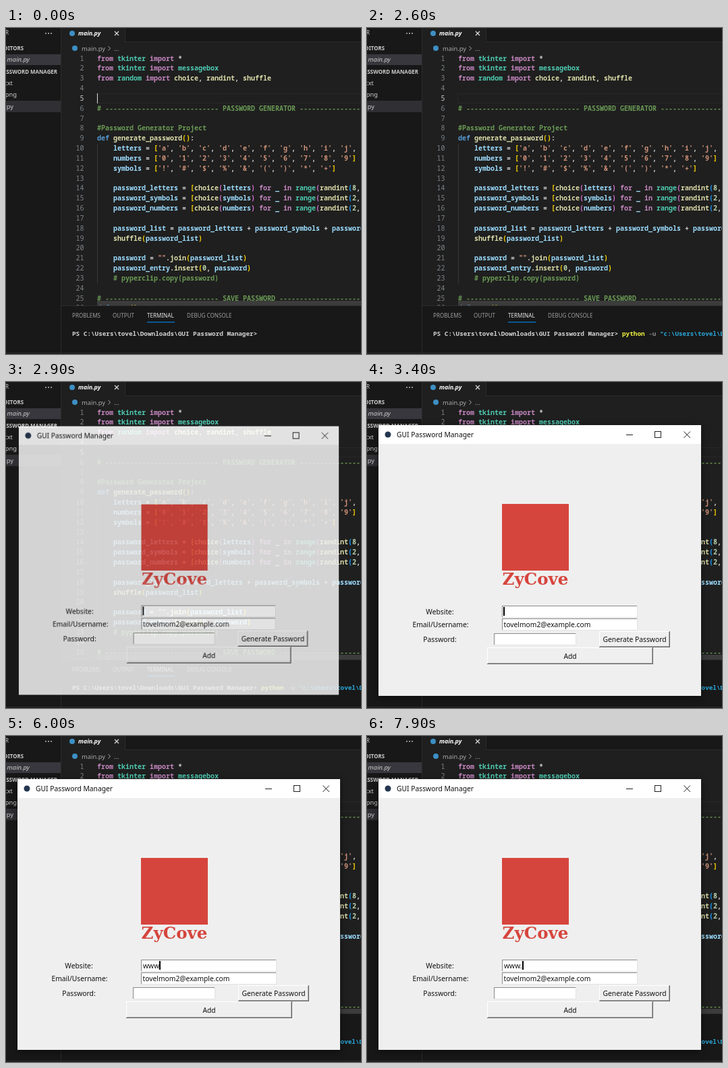
Recreate the animation shown at these times as an HTML page with a canvas. Size 526x484 px, loop 8 s.

```html
<!DOCTYPE html>
<html lang="en">
<head>
<meta charset="utf-8">
<title>Password manager demo</title>
<style>
html, body { margin: 0; width: 100%; height: 100%; overflow: hidden; background: #181818; }
canvas { display: block; }
</style>
</head>
<body>
<canvas id="stage" width="526" height="484"></canvas>
<script>
const W = 526, H = 484, LOOP = 8000;
const SANS = '"Noto Sans", "Open Sans", sans-serif';
const MONO = '"Noto Sans Mono", "DejaVu Sans Mono", monospace';
const RED = '#d6453d';

const CODE = [
  'from tkinter import *',
  'from tkinter import messagebox',
  'from random import choice, randint, shuffle',
  '', '',
  `# ${'-'.repeat(28)} PASSWORD GENERATOR ${'-'.repeat(31)} #`,
  '',
  '#Password Generator Project',
  'def generate_password():',
  `    letters = [${[...'abcdefghijkl'].map(c => `'${c}'`).join(', ')}]`,
  `    numbers = [${[...'0123456789'].map(c => `'${c}'`).join(', ')}]`,
  `    symbols = [${[...'!#$%&()*+'].map(c => `'${c}'`).join(', ')}]`,
  '',
  '    password_letters = [choice(letters) for _ in range(randint(8, 10))]',
  '    password_symbols = [choice(symbols) for _ in range(randint(2, 4))]',
  '    password_numbers = [choice(numbers) for _ in range(randint(2, 4))]',
  '',
  '    password_list = password_letters + password_symbols + password_numbers',
  '    shuffle(password_list)',
  '',
  '    password = "".join(password_list)',
  '    password_entry.insert(0, password)',
  '    # pyperclip.copy(password)',
  '',
  `# ${'-'.repeat(28)} SAVE PASSWORD ${'-'.repeat(31)} #`,
  'def save():'
];

const WORD_COLORS = {};
const paintWords = (color, words) => words.split(' ').forEach(w => WORD_COLORS[w] = color);
paintWords('#c586c0', 'from import for in');
paintWords('#569cd6', 'def');
paintWords('#4ec9b0', 'tkinter messagebox random range');
paintWords('#dcdcaa', 'choice randint shuffle generate_password join insert save');
const BRACKETS = ['#ffd700', '#da70d6', '#179fff'];
const TOKEN = /(#.*)|('[^']*'|"[^"]*")|(\d+)|([A-Za-z_]\w*)|([[(])|([\])])|(\S)/g;

function layer() {
  const canvas = document.createElement('canvas');
  canvas.width = W;
  canvas.height = H;
  return canvas.getContext('2d');
}

function rect(c, x, y, w, h, color) {
  c.fillStyle = color;
  c.fillRect(x, y, w, h);
}

function text(c, str, x, y, font, color, align = 'left') {
  c.font = font;
  c.fillStyle = color;
  c.textAlign = align;
  c.fillText(str, x, y);
}

function line(c, color, width, ...points) {
  c.strokeStyle = color;
  c.lineWidth = width;
  c.beginPath();
  for (let i = 0; i < points.length; i += 4) {
    c.moveTo(points[i], points[i + 1]);
    c.lineTo(points[i + 2], points[i + 3]);
  }
  c.stroke();
}

function dot(c, x, y, r, color) {
  c.fillStyle = color;
  c.beginPath();
  c.arc(x, y, r, 0, Math.PI * 2);
  c.fill();
}

const lineY = i => 48.6 + i * 14.83;

function drawCodeLine(c, source, y) {
  let depth = 0;
  for (const m of source.matchAll(TOKEN)) {
    const [token, comment, string, number, word, open, close] = m;
    let color = '#d4d4d4';
    if (comment) color = '#6a9955';
    else if (string) color = '#ce9178';
    else if (number) color = '#b5cea8';
    else if (word) color = WORD_COLORS[word] || '#9cdcfe';
    else if (open) color = BRACKETS[depth++ % 3];
    else if (close) color = BRACKETS[--depth % 3];
    text(c, token, 135 + m.index * 6, y, `600 10px ${MONO}`, color);
  }
}

function drawSidebar(c) {
  rect(c, 0, 0, 82, H, '#181818');
  rect(c, 0, 39, 81, 16, '#37373d');
  rect(c, 0, 108, 81, 17, '#2f2f34');
  rect(c, 81, 0, 1, H, '#2b2b2b');
  const label = (str, end, y, font) => text(c, str, end, y, `${font} ${SANS}`, '#cccccc', 'right');
  label('EXPLORER', 4, 10, '8px');
  label('OPEN EDITORS', 26, 33, 'bold 7.9px');
  label('main.py', 35, 50, 'italic 9.4px');
  label('PASSWORD MANAGER', 76, 68, 'bold 7.9px');
  label('data.txt', 10, 85, '9.4px');
  label('logo.png', 16, 102, '9.4px');
  label('main.py', 11, 120, '9.4px');
  for (const x of [59, 63, 67]) dot(c, x, 8, 0.9, '#cccccc');
}

function drawEditor(c) {
  rect(c, 82, 0, W - 82, 413, '#1f1f1f');
  rect(c, 176, 0, W - 176, 21, '#181818');
  rect(c, 176, 0, 1, 21, '#2b2b2b');
  rect(c, 176, 20, W - 176, 1, '#2b2b2b');

  dot(c, 98, 8, 4, '#3d8fc4');
  text(c, 'main.py', 107, 11, `italic bold 8.8px ${SANS}`, '#ffffff');
  line(c, '#dddddd', 1.2, 161, 5, 167, 11, 167, 5, 161, 11);
  dot(c, 102, 30, 4, '#3d8fc4');
  text(c, 'main.py', 112, 33.5, `9.4px ${SANS}`, '#a9a9a9');
  line(c, '#a9a9a9', 1, 151.5, 27, 154.5, 30.2, 154.5, 30.2, 151.5, 33.5);
  text(c, '...', 160, 33.5, `9.4px ${SANS}`, '#a9a9a9');

  c.strokeStyle = '#282828';
  c.lineWidth = 1;
  c.strokeRect(134.5, 97.5, W, 14);
  rect(c, 135, 172, 1, 207, '#383838');
  CODE.forEach((source, i) => {
    text(c, i + 1, 115.5, lineY(i), `10px ${MONO}`, i === 4 ? '#cccccc' : '#7d838a', 'right');
    drawCodeLine(c, source, lineY(i));
  });
  rect(c, 135, 405, W - 135, 7, 'rgba(121,121,121,.32)');
}

function drawPanel(c) {
  rect(c, 82, 413, W - 82, H - 413, '#181818');
  rect(c, 82, 412, W - 82, 1, '#2b2b2b');
  const tabs = { PROBLEMS: 98, OUTPUT: 158, TERMINAL: 209, 'DEBUG CONSOLE': 268 };
  for (const name in tabs) {
    text(c, name, tabs[name], 430, `8.1px ${SANS}`, name === 'TERMINAL' ? '#e7e7e7' : '#9d9d9d');
  }
  rect(c, 209, 436, 41, 1.3, '#0078d4');
  terminal(c, 'PS C:\\Users\\tovel\\Downloads\\GUI Password Manager>', 0, '#d4d4d4');
  rect(c, 0, 482, W, 1, '#2b2b2b');
}

function terminal(c, str, column, color) {
  text(c, str, 98 + column * 5.6, 457, `600 9.33px ${MONO}`, color);
}

function drawCommand(c) {
  terminal(c, 'python', 50, '#f5f543');
  terminal(c, '-u', 57, '#8a8a8a');
  terminal(c, '"c:\\Users\\tovel\\Downloads', 60, '#29a8db');
}

function drawFrame(c) {
  rect(c, 17, 64, 478, 402, '#efefef');
  rect(c, 17, 64, 478, 28, '#ffffff');
  dot(c, 31, 78, 4.5, '#24364f');
  text(c, 'GUI Password Manager', 44, 82, `10.3px ${SANS}`, '#111111');
  line(c, '#222222', 1, 384, 78.5, 394, 78.5, 469.5, 73.5, 479, 83, 479, 73.5, 469.5, 83);
  c.strokeRect(426.5, 73.5, 9, 9);
}

function bevel(c, x, y, w, h, fill, light, dark) {
  rect(c, x, y, w, h, dark);
  rect(c, x, y, w - 1, h - 1, light);
  rect(c, x + 1, y + 1, w - 2, h - 2, fill);
}

function drawForm(c) {
  rect(c, 200, 181, 99, 99, RED);
  text(c, 'ZyCove', 249.5, 301, 'bold 24.5px "DejaVu Serif", "Noto Serif", serif', RED, 'center');

  const font = `10.3px ${SANS}`;
  text(c, 'Website:', 108, 344.5, font, '#111', 'center');
  text(c, 'Email/Username:', 109, 364, font, '#111', 'center');
  text(c, 'Password:', 108, 385.5, font, '#111', 'center');
  for (const [x, y, w] of [[200, 332, 201], [200, 351, 201], [188, 373, 122]]) {
    bevel(c, x, y, w, 18, '#ffffff', '#8a8a8a', '#e3e3e3');
  }
  text(c, 'tovelmom2@example.com', 202.5, 364, font, '#111');

  const button = (label, x, y, w, h) => {
    bevel(c, x, y, w, h, '#a0a0a0', '#ffffff', '#696969');
    rect(c, x + 1, y + 1, w - 3, h - 3, '#efefef');
    text(c, label, x + w / 2, y + h / 2 + 4, font, '#111', 'center');
  };
  button('Generate Password', 344, 370, 105, 24);
  button('Add', 178, 394, 246, 25);
}

const editor = layer(), emptyWindow = layer(), fullWindow = layer();
drawSidebar(editor);
drawEditor(editor);
drawPanel(editor);
drawFrame(emptyWindow);
drawFrame(fullWindow);
drawForm(fullWindow);

// Time and content of the website entry; each key press restarts the caret blink.
const TYPING = [[2900, ''], [5500, 'w'], [5700, 'ww'], [5900, 'www'], [6900, 'www.']];
const stage = document.getElementById('stage').getContext('2d');

function drawEntry(t) {
  const [since, value] = TYPING.filter(([at]) => at <= t).pop();
  text(stage, value, 203, 344.5, `10.3px ${SANS}`, '#111');
  if ((t - since) % 900 < 600) {
    const caret = 202 + (value && stage.measureText(value).width + 1);
    rect(stage, Math.round(caret), 334, 2, 13, '#000');
  }
}

function drawWindow(t) {
  const [scale, alpha, image] =
    t < 2900 ? [0.96, 0.18, emptyWindow] :
    t < 3000 ? [0.992, 0.87, fullWindow] : [1, 1, fullWindow];
  stage.save();
  stage.translate(256.5, 265.5);
  stage.scale(scale, scale);
  stage.translate(-256.5, -265.5);
  stage.globalAlpha = alpha;
  if (alpha === 1) {
    stage.shadowColor = 'rgba(0,0,0,.45)';
    stage.shadowBlur = 12;
    stage.shadowOffsetY = 3;
  }
  stage.drawImage(image.canvas, 0, 0);
  stage.shadowColor = 'transparent';
  if (t >= 2900) drawEntry(t);
  stage.restore();
}

function render(t) {
  stage.drawImage(editor.canvas, 0, 0);
  const caretOn = t < 100 || Math.floor((t + 400) / 500) % 2 === 1;
  if (caretOn && t < 2800) rect(stage, 135, 97, 1, 15, '#d4d4d4');
  if (t >= 500) drawCommand(stage);
  if (t >= 2800) drawWindow(t);
}

const start = performance.now();
function tick() {
  render((performance.now() - start) % LOOP);
  requestAnimationFrame(tick);
}
tick();
</script>
</body>
</html>
```
